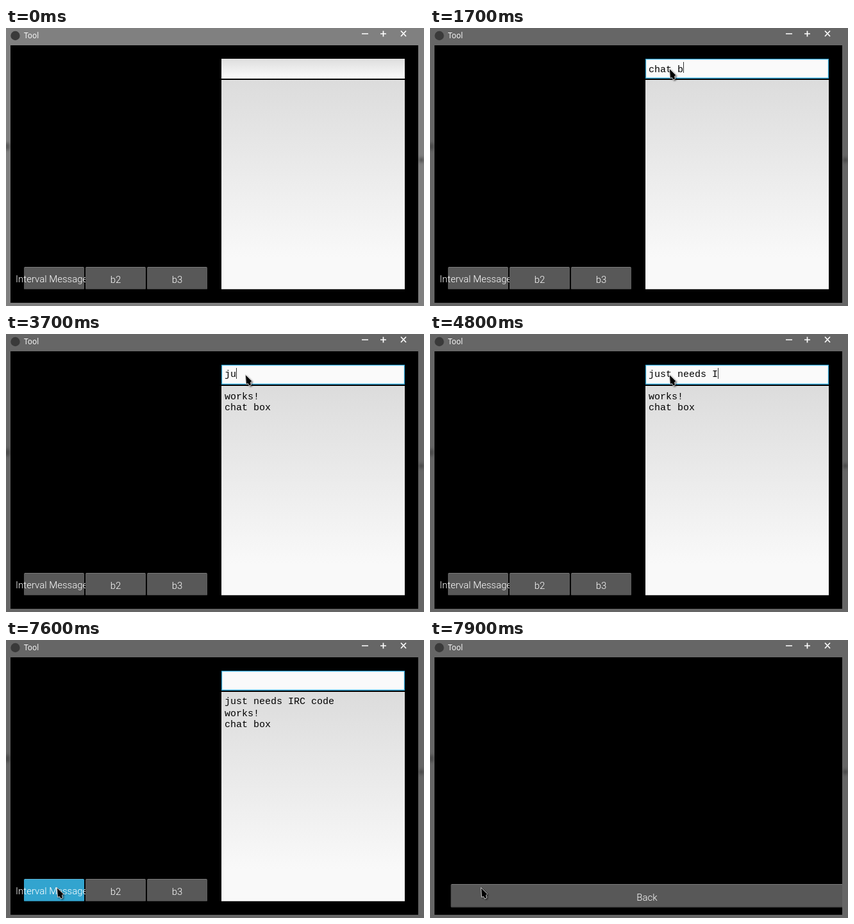
An HTML page that plays this animation: 652 px wide and 434 px high, repeating every 8 s.

```html
<!DOCTYPE html>
<html lang="en">
<head>
<meta charset="utf-8">
<title>Tool</title>
<style>
html, body { margin: 0; width: 100%; height: 100%; overflow: hidden; background: #666; }
svg { display: block; }
.mono { font: 15px "Courier New", "Liberation Mono", monospace; fill: #000; white-space: pre; }
.label { font: 300 15px Roboto, sans-serif; fill: #fff; text-anchor: middle; }
.title { font: 500 12px "Open Sans", "Noto Sans", sans-serif; fill: #fff; }
</style>
</head>
<body>
<svg id="stage" width="652" height="434" viewBox="0 0 652 434">
  <defs>
    <linearGradient id="bar" x1="0" y1="0" x2="0" y2="1">
      <stop offset="0" stop-color="#dedede"/><stop offset="1" stop-color="#fbfbfb"/>
    </linearGradient>
    <linearGradient id="area" x1="0" y1="0" x2="0" y2="1">
      <stop offset="0" stop-color="#dcdcdc"/><stop offset=".85" stop-color="#f9f9f9"/>
    </linearGradient>
    <filter id="soft" x="-100%" y="-100%" width="300%" height="300%"><feGaussianBlur stdDeviation="2"/></filter>
    <filter id="shade" x="-50%" y="-50%" width="220%" height="220%">
      <feDropShadow dx="1.5" dy="1.5" stdDeviation="1" flood-opacity=".55"/>
    </filter>
    <clipPath id="client"><rect x="7" y="27" width="636" height="402"/></clipPath>
  </defs>

  <rect id="frame" width="652" height="434"/>
  <g filter="url(#soft)" fill="#333" opacity=".55">
    <ellipse cx="2" cy="185" rx="4" ry="6"/>
    <ellipse cx="648" cy="206" rx="4" ry="4"/>
  </g>
  <circle cx="14.5" cy="12" r="7.2" fill="#3a3a3a"/>
  <text class="title" x="28" y="16">Tool</text>
  <path d="M555 9H565M584 9H593M588.5 4.5V13.5M616 4.5L624 13M624 4.5L616 13" fill="none" stroke="#fff" stroke-width="1.7"/>
  <rect x="7" y="27" width="636" height="402"/>

  <g clip-path="url(#client)">
    <g id="main">
      <rect x="336" y="48" width="286" height="31" fill="url(#bar)"/>
      <g id="focus">
        <rect x="336" y="48" width="286" height="31" fill="#33a9dc"/>
        <rect x="337.2" y="49.3" width="283.6" height="28.2" fill="#fafafa"/>
      </g>
      <rect x="336" y="81" width="286" height="327" fill="url(#area)"/>
      <path d="M336 407.5H622" stroke="#c4c4c4"/>
      <text id="draft" class="mono" x="341"/>
      <g id="chat"></g>
      <rect id="caret" x="341" y="53" width="1" height="17" fill="#333"/>
      <g id="buttons"></g>
    </g>
    <g id="next"></g>
  </g>
  <path id="mouse" d="M.5 .5L10.5 10.5L8.5 12.5L9.5 16.5L6.5 18L4.5 14.5L1.5 15.5Z" fill="#050505" stroke="#c8c8c8" stroke-width="1" filter="url(#shade)"/>
</svg>
<script>
const LOOP = 8000, STEP = 100, SCREEN = 636, CHAR = 9;
const $ = id => document.getElementById(id);

// time, typed characters; a newline sends the draft
const keys = [
  [1100, "c"], [1200, "h"], [1300, "a"], [1400, "t"], [1500, " "],
  [1700, "b"], [1800, "o"], [1900, "x"], [2000, "\n"],
  [2300, "w"], [2400, "o"], [2500, "r"], [2600, "k"], [2700, "s"],
  [2900, "!"], [3000, "\n"],
  [3600, "j"], [3700, "u"], [3800, "s"], [3900, "t"], [4000, " "],
  [4200, "n"], [4300, "ee"], [4500, "d"], [4600, "s "],
  [4800, "I"], [4900, "R"], [5100, "C"], [5600, " "],
  [5800, "c"], [5900, "od"], [6100, "e"], [6200, "\n"]
];
const caretOff = [[0, 500], [3400, 3600], [6600, 7100], [7600, LOOP]];
const mousePath = [
  [200, 520, 300], [300, 430, 150], [400, 379, 70], [500, 373, 63],
  [6800, 356, 82], [6900, 292, 152], [7000, 205, 248], [7100, 128, 332],
  [7200, 90, 374], [7300, 79, 386]
];
const frameTone = [[0, 128], [200, 120], [300, 111], [400, 105], [500, 102]];

const latest = (rows, t) => rows.filter(r => r[0] <= t).pop();
const lift = line => /[gjpqy]/.test(line) ? 2 : 0;
const show = (el, on) => el.setAttribute("visibility", on ? "inherit" : "hidden");
const slide = (el, x) => el.setAttribute("transform", `translate(${x} 0)`);

function add(parent, tag, attrs, text = "") {
  const el = document.createElementNS("http://www.w3.org/2000/svg", tag);
  for (const name in attrs) el.setAttribute(name, attrs[name]);
  el.textContent = text;
  return parent.appendChild(el);
}

function button(parent, x, y, width, height, label, baseline) {
  const face = add(parent, "rect", { x, y, width, height, rx: 1.5, fill: "#585858" });
  add(parent, "path", { d: `M${x + 1} ${y + .5}h${width - 2}`, stroke: "#fff", "stroke-opacity": .22 });
  add(parent, "path", { d: `M${x + 1} ${y + height - .5}h${width - 2}`, stroke: "#000", "stroke-opacity": .25 });
  add(parent, "text", { class: "label", x: x + width / 2, y: baseline }, label);
  return face;
}

const interval = button($("buttons"), 28, 373, 94, 35, "Interval Messages", 397);
button($("buttons"), 124, 373, 94, 35, "b2", 398);
button($("buttons"), 220, 373, 94, 35, "b3", 398);
button($("next"), 18.5, 381, 612, 36.5, "Back", 407);
const rows = [102, 119, 136].map(y => add($("chat"), "text", { class: "mono", x: 341, y }));

function draw(t) {
  const typed = keys.filter(k => k[0] <= t).map(k => k[1]).join("").split("\n");
  const draft = typed.pop();
  const sent = typed.reverse();

  $("draft").textContent = draft;
  $("draft").setAttribute("y", 69 - lift(draft));
  rows.forEach((row, i) => {
    const line = sent[i] || "";
    row.textContent = line;
    row.setAttribute("y", 102 + 17 * i - lift(line));
  });

  show($("focus"), t >= 500 && t < 7700);
  show($("caret"), !caretOff.some(([from, to]) => t >= from && t < to));
  slide($("caret"), draft.length * CHAR);
  interval.setAttribute("fill", t >= 7500 && t < 7700 ? "#32a4cf" : "#585858");

  const tone = latest(frameTone, t)[1];
  $("frame").setAttribute("fill", `rgb(${tone},${tone},${tone})`);

  const pos = latest(mousePath, t);
  show($("mouse"), pos);
  if (pos) $("mouse").setAttribute("transform", `translate(${pos[1]} ${pos[2]})`);

  // quadratic ease-out screen change
  const p = Math.min(1, Math.max(0, (t - 7601) / 351));
  const shift = Math.round(SCREEN * (1 - (1 - p) ** 2));
  slide($("main"), -shift);
  slide($("next"), SCREEN - shift);
}

const start = performance.now();
function tick() {
  const t = (performance.now() - start) % LOOP;
  draw(Math.floor(t / STEP) * STEP);
  requestAnimationFrame(tick);
}
tick();
</script>
</body>
</html>
```
